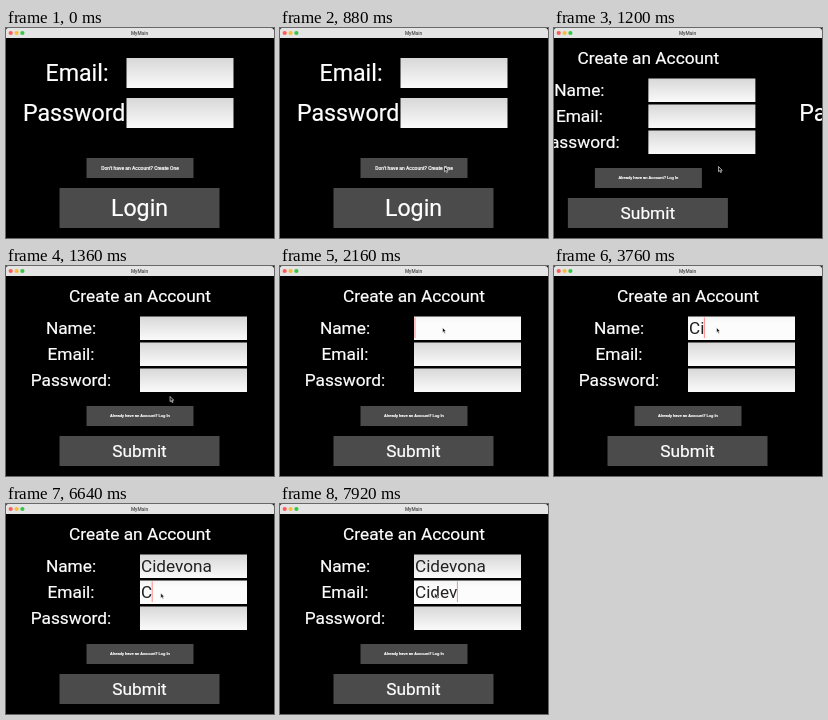
These frames come from a looping animation (268 px wide and 210 px high, 8000 ms). An HTML page:

```html
<!DOCTYPE html>
<html lang="en">
<head>
<meta charset="utf-8">
<title>MyMain</title>
<style>
  html, body { margin: 0; width: 100%; height: 100%; overflow: hidden; background: #000; }
  svg { display: block; width: 268px; height: 210px; }
  text { font-family: Roboto, sans-serif; fill: #fff; text-anchor: middle; }
  .label { stroke: #fff; stroke-width: .22px; }
  .typed { font-size: 17.2px; fill: #222; text-anchor: start; }
  .caret { fill: #f88; }
</style>
</head>
<body>
<svg viewBox="0 0 268 210">
  <defs>
    <linearGradient id="idle" x2="0" y2="1">
      <stop stop-color="#d8d8d8"/><stop offset="1" stop-color="#fafafa"/>
    </linearGradient>
    <linearGradient id="focus" x2="0" y2="1">
      <stop stop-color="#f4f4f4"/><stop offset=".3" stop-color="#fcfcfc"/>
    </linearGradient>
  </defs>
  <g id="login"></g>
  <g id="signup"></g>
  <path d="M0 10V2Q0 0 2 0H265Q268 0 268 3V10Z" fill="#e4e4e4"/>
  <circle cx="4.7" cy="5" r="2.1" fill="#fc5b57"/>
  <circle cx="10.6" cy="5" r="2.1" fill="#f5bd3c"/>
  <circle cx="16.4" cy="5" r="2.1" fill="#35c64a"/>
  <text x="133.5" y="7" style="font-size:4.8px;font-weight:500;fill:#444">MyMain</text>
  <path id="mouse" d="M0 0V5.2L1.2 4.2L2.1 6.1L3 5.7L2.1 3.8H3.7Z" fill="#111" stroke="#fff" stroke-width=".6"/>
</svg>
<script>
const LOOP = 8000, STEP = 80, WIDTH = 268, BLINK = 520, SIZE = 17.3;
const NAME = 'Cidevona';
const $ = id => document.getElementById(id);

// Text placed by the middle of its capitals
const label = (text, x, y, size) =>
  `<text class="label" x="${x}" y="${y + size * .355}" font-size="${size}">${text}</text>`;
const button = (text, x, y, w, h, size) =>
  `<rect x="${x}" y="${y}" width="${w}" height="${h}" fill="#4b4b4b"/>` +
  label(text, x + w / 2, y + h / 2, size);
const field = (x, y, h) =>
  `<g><rect x="${x}" y="${y}" width="107" height="${h}" fill="url(#idle)"/>
   <text class="typed" x="${x + 1}" y="${y + 17}"></text>
   <rect class="caret" y="${y + 1}" width="1" height="${h - 3}"/></g>`;

$('login').innerHTML =
  label('Email:', 71, 45, 23.2) + label('Password:', 71, 85, 23.2) +
  field(120.5, 30, 30) + field(120.5, 70, 30) +
  button("Don't have an Account? Create One", 80.5, 130, 107, 20, 5) +
  button('Login', 53.5, 160, 160, 40, 23.2);

$('signup').innerHTML =
  label('Create an Account', 134, 30, SIZE) +
  ['Name:', 'Email:', 'Password:'].map((text, i) =>
    label(text, 65, 61.7 + 26 * i, SIZE) + field(134, 50.5 + 26 * i, 23.5)).join('') +
  button('Already have an Account? Log In', 80.5, 140, 107, 20, 4.15) +
  button('Submit', 53.5, 170, 160, 30, SIZE);

const inputs = [
  { from: 2080, to: 5760, keys: [3280, 3760, 3920, 4080, 4320, 4720, 4880, 4960] },
  { from: 5760, to: LOOP, keys: [6480, 6960, 7120, 7280, 7600] },
];
const fields = [...document.querySelectorAll('#login g, #signup g')];
fields.forEach(g => g.lastChild.setAttribute('visibility', 'hidden'));

// Pointer stops: time, x, y
const stops = [
  [80, 205, 150], [720, 164.5, 138.5], [1280, 164.5, 138.5], [1680, 160, 61],
  [1840, 162.5, 61.5], [5040, 162.5, 61.5], [5520, 154.7, 89],
];
const ease = p => p * p * (3 - 2 * p);

function pointerAt(t) {
  const i = stops.findIndex(s => s[0] > t);
  if (i < 0) return stops.at(-1).slice(1);
  const a = stops[Math.max(0, i - 1)], b = stops[i];
  const p = ease(Math.max(0, (t - a[0]) / (b[0] - a[0])));
  return [a[1] + (b[1] - a[1]) * p, a[2] + (b[2] - a[2]) * p];
}

function drawInput({ from, to, keys }, g, t) {
  const [box, text, caret] = g.children;
  const pressed = keys.filter(k => k <= t);
  const focused = t >= from && t < to;
  const sinceKey = t - (pressed.at(-1) ?? from);
  const caretOn = focused && Math.floor(sinceKey / BLINK) % 2 === 0;
  text.textContent = NAME.slice(0, pressed.length);
  box.setAttribute('fill', `url(#${focused ? 'focus' : 'idle'})`);
  caret.setAttribute('visibility', caretOn ? 'visible' : 'hidden');
  const width = pressed.length ? text.getComputedTextLength() : 0;
  caret.setAttribute('x', +text.getAttribute('x') - .5 + width);
}

function draw(now) {
  const t = Math.floor(now % LOOP / STEP) * STEP;
  const slide = WIDTH * Math.min(1, Math.max(0, (t - 883) / 372));
  $('login').setAttribute('transform', `translate(${slide})`);
  $('signup').setAttribute('transform', `translate(${slide - WIDTH})`);
  inputs.forEach((input, i) => drawInput(input, fields[i + 2], t));
  $('mouse').setAttribute('transform', `translate(${pointerAt(t)})`);
  $('mouse').setAttribute('visibility', t < 80 ? 'hidden' : 'visible');
}

const start = performance.now();
function tick() {
  draw(performance.now() - start);
  requestAnimationFrame(tick);
}
tick();
</script>
</body>
</html>
```
